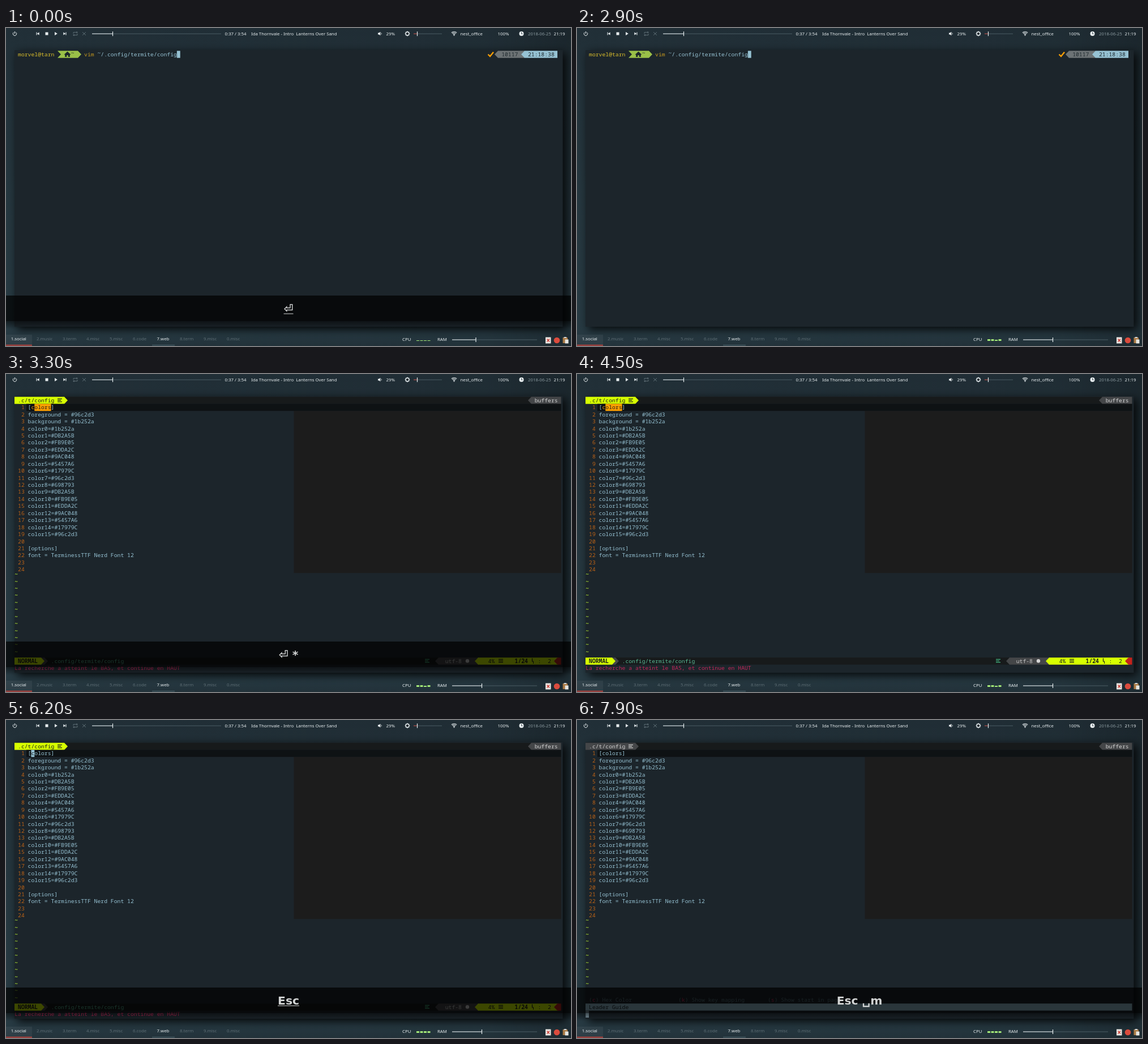
Write an HTML page with a canvas that moves like this. It is 998 px wide and 561 px high and loops after 8 s.

```html
<!DOCTYPE html>
<html lang="en">
<head>
<meta charset="utf-8">
<style>
html, body { margin: 0; width: 998px; height: 561px; overflow: hidden; background: #25343c; }
canvas { display: block; }
</style>
</head>
<body>
<canvas id="stage" width="998" height="561"></canvas>
<script>
const g = document.getElementById('stage').getContext('2d');
const CELL = 5.85, LINE = 12.43, LEFT = 15.2, TOP = 40.3, LOOP = 8000;
const LIME = '#d7ff00', FG = '#96c2d3', DARK = '#1c1c1c', GREY = '#444648', TERM = '#1c252b', WHITE = '#e8eef0', DIM = '#5d6d74';
const STRIP = '#171a1b', CURRENT = '#0e1214';
const MONO = '9.75px "Noto Sans Mono", "DejaVu Sans Mono", monospace';
const SANS = '7.8px "Noto Sans", "Open Sans", sans-serif';
const KEYS = 'bold 20.3px "DejaVu Sans", sans-serif';

const colX = c => LEFT + c * CELL;
const rowY = r => TOP + r * LINE;
const ramp = (t, a, b) => Math.min(1, Math.max(0, (t - a) / (b - a)));
// last entry of [time, value] pairs that has begun
const at = (t, list) => list.filter(e => e[0] <= t).pop()[1];

function rect(color, x, y, w, h) {
  g.fillStyle = color;
  g.fillRect(x, y, w, h);
}
function poly(color, ...p) {
  g.fillStyle = color;
  g.beginPath();
  for (let i = 0; i < p.length; i += 2) g.lineTo(p[i], p[i + 1]);
  g.fill();
}
function stroke(color, width, ...p) {
  g.strokeStyle = color;
  g.lineWidth = width;
  g.beginPath();
  for (let i = 0; i < p.length; i += 2) g.lineTo(p[i], p[i + 1]);
  g.stroke();
}
function arc(color, x, y, r, a = 0, b = 7, width = 0) {
  g.beginPath();
  g.arc(x, y, r, a, b);
  if (width) { g.strokeStyle = color; g.lineWidth = width; g.stroke(); }
  else { g.fillStyle = color; g.fill(); }
}
function text(s, x, y, color, font = SANS) {
  g.font = font;
  g.fillStyle = color;
  g.fillText(s, x, y);
}
const term = (s, col, row, color, bold = '') => text(s, colX(col), rowY(row) + 9.6, color, bold + MONO);
function cell(color, col, row, n = 1) {
  rect(color, colX(col), rowY(row), n * CELL, LINE);
}
// strip with shaped ends: left 1 = notch, -1 = point; right 1 = point
function strip(color, x1, x2, row, left = 0, right = 0) {
  const y = rowY(row), m = y + LINE / 2, b = y + LINE, d = 6;
  const a = left < 0 ? x1 + d : x1, z = right ? x2 - d : x2;
  poly(color, a, y, z, y, x2, m, z, b, a, b, left > 0 ? x1 + d : x1, m);
}
function lines(color, x, y, widths) {
  widths.forEach((w, i) => rect(color, x, y + i * 2.6, w, 1.2));
}
function slider(x1, x2, knob, y, lead = WHITE) {
  rect('#4b5c64', x1, y - .5, x2 - x1, 1);
  rect(lead, x1, y - .5, knob - x1, 1);
  rect(WHITE, knob - .6, y - 4, 1.2, 8);
}
function shadowed(blur, offset, paint) {
  g.save();
  g.shadowColor = 'rgba(0,0,0,.85)';
  g.shadowBlur = blur;
  g.shadowOffsetX = g.shadowOffsetY = offset;
  paint();
  g.restore();
}

function wallpaper() {
  const v = g.createLinearGradient(0, 0, 0, 561);
  v.addColorStop(0, '#212f37');
  v.addColorStop(.5, '#25363e');
  v.addColorStop(.96, '#273a43');
  v.addColorStop(1, '#23333b');
  rect(v, 0, 0, 998, 561);
  const h = g.createLinearGradient(0, 0, 998, 0);
  h.addColorStop(0, 'rgba(0,0,0,0)');
  h.addColorStop(.85, 'rgba(0,0,0,.05)');
  h.addColorStop(1, 'rgba(0,0,0,.2)');
  rect(h, 0, 0, 998, 561);
  shadowed(15, 5, () => rect(TERM, 15, 39, 968.5, 488));
}

function topBar() {
  arc(WHITE, 15.5, 10.2, 3.2, -1, 4.15, 1);
  rect(WHITE, 15, 6, 1, 4);
  rect(WHITE, 53.5, 7.5, 1.1, 5); poly(WHITE, 58.6, 7.5, 58.6, 12.5, 54.8, 10);
  rect(WHITE, 69.5, 7.5, 5, 5);
  poly(WHITE, 86, 7, 90.8, 10, 86, 13);
  rect(WHITE, 105.4, 7.5, 1.1, 5); poly(WHITE, 101.4, 7.5, 101.4, 12.5, 105.2, 10);
  stroke(DIM, 1, 119, 10, 119, 7.7, 125, 7.7);
  stroke(DIM, 1, 126, 10, 126, 12.5, 120, 12.5);
  poly(DIM, 124.5, 5.8, 127, 7.7, 124.5, 9.6);
  poly(DIM, 120.5, 10.6, 118, 12.5, 120.5, 14.4);
  stroke(DIM, 1, 135, 7.3, 141, 12.8);
  stroke(DIM, 1, 135, 12.8, 141, 7.3);
  slider(152, 380, 188.5, 10.2);
  text('0:37 / 3:54', 386.6, 13, WHITE);
  text('Ida Thornvale - Intro  Lanterns Over Sand', 433, 13, WHITE);
  poly(WHITE, 657, 8.5, 659, 8.5, 661.3, 6.7, 661.3, 13.3, 659, 11.5, 657, 11.5);
  arc(WHITE, 661.3, 10, 2, -.9, .9, .8);
  text('29%', 671.5, 13, WHITE);
  arc(WHITE, 709, 10, 3, 0, 7, 1.3);
  for (let i = 0; i < 8; i++) {
    const c = Math.cos(i * Math.PI / 4), s = Math.sin(i * Math.PI / 4);
    stroke(WHITE, 1.2, 709 + 3 * c, 10 + 3 * s, 709 + 4.5 * c, 10 + 4.5 * s);
  }
  slider(720, 770, 726.5, 10.2, '#c0453c');
  for (const r of [2.5, 4.6, 6.7]) arc(WHITE, 791.5, 13.2, r, -2.35, -.79, 1.1);
  arc(WHITE, 791.5, 12.8, 1);
  text('nest_office', 802.5, 13, WHITE);
  text('100%', 868.5, 13, WHITE);
  arc(WHITE, 910.5, 10, 4);
  stroke('#25343c', .9, 910.5, 7.3, 910.5, 10.2, 912.7, 10.2);
  text('2018-06-25', 922, 13, '#8a999f');
  text('21:19', 967.5, 13, WHITE);
}

function bottomBar(t) {
  rect('rgba(255,255,255,.05)', 0, 541, 46, 20);
  rect('#c8423b', 0, 558.8, 46, 1.6);
  rect('#435963', 258, 558.8, 40, 1.4);
  const names = ['1.social', '2.music', '3.term', '4.misc', '5.misc', '6.code', '7.web', '8.term', '9.misc', '0.misc'];
  const xs = [8.7, 54, 100, 142, 183, 224, 266.5, 307, 349, 390];
  names.forEach((s, i) => text(s, xs[i], 551.4, i % 6 ? DIM : WHITE));
  text('CPU', 700, 552, WHITE);
  text('RAM', 762, 552, WHITE);
  const load = at(t, [[0, '1111'], [300, '1121'], [1000, '1141'], [2000, '2122'], [2500, '3223'], [2900, '3323'], [4600, '3333']]);
  [...load].forEach((n, i) => rect('#a3e878', 725 + i * 6.5, 552 - n, 5, +n));
  slider(788, 938, at(t, [[0, 830], [500, 835.5], [2400, 840.5]]), 550);
  rect('#e9e6e2', 953, 545.5, 9.5, 11);
  stroke('#cc3b33', 1.4, 955.5, 548.5, 960, 553.5);
  stroke('#cc3b33', 1.4, 960, 548.5, 955.5, 553.5);
  arc('#db4b3d', 973, 551, 5.3);
  rect('#a97a45', 983.5, 546, 8.5, 10);
  rect('#cfd3d5', 985.5, 545, 4.5, 2);
  rect('#e6e6e2', 987.5, 549.5, 6, 7);
}

function shell() {
  term('morvel@tarn', 1, 0, '#d9bd2c');
  strip('#9ac048', 91, 133, 0, 1, 1);
  poly('#1b252a', 102.5, 47, 108.5, 41.5, 114.5, 47, 112.8, 47, 112.8, 51, 109.8, 51, 109.8, 48, 107.3, 48, 107.3, 51, 104.2, 51, 104.2, 47);
  term('~', 17, -.25, '#1b252a');
  term('vim', 21, 0, '#c99a1f');
  term('~', 25, -.25, FG);
  term('/.config/termite/config', 26, 0, FG);
  cell(FG, 49, 0);
  stroke('#fb9e05', 2.4, 851.5, 46.5, 855, 50, 861, 42.5);
  strip('#6d7375', 863, 916, 0, -1);
  term('10117', 147, 0, '#1f2a2f');
  strip(FG, 910, 974, 0, -1);
  term('21:18:38', 155, 0, '#1b252a');
}

const CONFIG = ['[colors]', 'foreground = #96c2d3', 'background = #1b252a'];
'1b252a DB2A5B FB9E05 EDDA2C 9AC048 5457A6 17979C 96c2d3 698793 DB2A5B FB9E05 EDDA2C 9AC048 5457A6 17979C 96c2d3'
  .split(' ').forEach((c, i) => CONFIG.push(`color${i}=#${c}`));
CONFIG.push('', '[options]', 'font = TerminessTTF Nerd Font 12', '', '');

function statusLine(found) {
  rect(STRIP, 15, rowY(37), 965.5, LINE);
  strip(GREY, 60, 74, 37, 0, 1);
  strip(LIME, 15, 68, 37, 0, 1);
  term('NORMAL', 1, 37, DARK, 'bold ');
  term('.config/termite/config', 11, 37, '#58b995');
  lines('#43b883', 740, 502.8, [8, 6, 8]);
  strip(GREY, 758, 836, 37, -1);
  term('utf-8', 130, 37, '#c8c8c8');
  arc('#d5d5d5', 815, 506.3, 3.2);
  strip(LIME, 828, 976, 37, -1);
  term('4%', 143, 37, DARK);
  lines(DARK, 870, 502.8, [8, 8, 8]);
  term('1/24', 151, 37, DARK, 'bold ');
  stroke(DARK, 1.2, 929.5, 501.5, 929.5, 507, 932, 507);
  stroke(DARK, 1, 931.5, 511, 931.5, 507);
  term(':', 158, 37, DARK);
  term('2', 161, 37, DARK);
  strip('#c4231c', 968, 980.5, 37, -1);
  if (found) term('La recherche a atteint le BAS, et continue en HAUT', 0, 38, '#c2285a');
}

function guide() {
  [['c', 'Hex Color', 1], ['k', 'Show key mapping', 28], ['s', 'Show start in page', 55]].forEach(([k, s, c]) => {
    term('( ) ' + s, c, 36, '#587480');
    term(k, c + 1, 36, '#db2a5b');
  });
  rect(FG, 15, rowY(37), 965.5, LINE);
  term('Leader Guide', 1, 37, '#1b252a');
  cell('#7f98a4', 0, 38);
}

function vim(t) {
  const found = t >= 3100, lit = found && t < 5800, menu = t >= 7400;
  rect(STRIP, 15, TOP, 965.5, LINE);
  strip(menu ? GREY : LIME, 15, 109, 0, 0, 1);
  const ink = menu ? '#d0d0d0' : DARK;
  term('.c/t/config', 1, 0, ink);
  lines(ink, 91, 43.2, [8, 6, 8]);
  strip(GREY, 922, 980.5, 0, -1);
  term('buffers', 157, 0, '#d5d5d5');
  rect(CURRENT, 36, rowY(1), 944.5, LINE);
  rect(DARK, 508.5, rowY(2), 472, 23 * LINE);
  CONFIG.forEach((s, i) => {
    term(String(i + 1).padStart(2), 1, i + 1, '#bb6217');
    term(s, 4, i + 1, FG);
  });
  if (lit) {
    cell(CURRENT, 5, 1);
    term('c', 5, 1, '#ff9f00');
    cell('#ff9f00', 6, 1, 5);
    term('olors', 6, 1, DARK);
  } else if (!menu) {
    const c = found ? 5 : 4;
    cell(FG, c, 1);
    term('[c'[c - 4], c, 1, CURRENT);
  }
  for (let r = 25; r < (menu ? 35 : 37); r++) term('~', 0, r - .28, '#a4d832', 'bold ');
  if (menu) guide(); else statusLine(found);
}

function keyBand(t) {
  const a = t < 3000 ? 1 - ramp(t, 1290, 1600)
    : t < 5700 ? ramp(t, 3000, 3300) - ramp(t, 4090, 4400)
    : ramp(t, 5700, 6000);
  if (!a) return;
  g.save();
  const shade = g.createLinearGradient(0, 517, 0, 531);
  shade.addColorStop(0, 'rgba(0,0,0,.5)');
  shade.addColorStop(1, 'rgba(0,0,0,0)');
  g.globalAlpha = a;
  rect(shade, 0, 517, 998, 14);
  g.globalAlpha = a * .72;
  rect('#000', 0, 472, 998, 45);
  g.globalAlpha = a;
  const s = at(t, [[0, '⏎'], [3000, '⏎ *'], [5700, 'Esc'], [7000, 'Esc ␣'], [7200, 'Esc ␣m']]);
  g.font = KEYS;
  const w = g.measureText(s).width;
  text(s, 499 - w / 2, 501.7, '#d2d4d4', KEYS);
  if (t < 500 || t >= 5700 && t < 6600) rect('#d2d4d4', 499 - w / 2, 503.6, w, 1);
  g.restore();
}

function draw() {
  const t = Math.floor(performance.now() % LOOP / 100) * 100;
  wallpaper();
  topBar();
  if (t < 3000) shell(); else vim(t);
  keyBand(t);
  bottomBar(t);
  requestAnimationFrame(draw);
}
draw();
</script>
</body>
</html>
```
